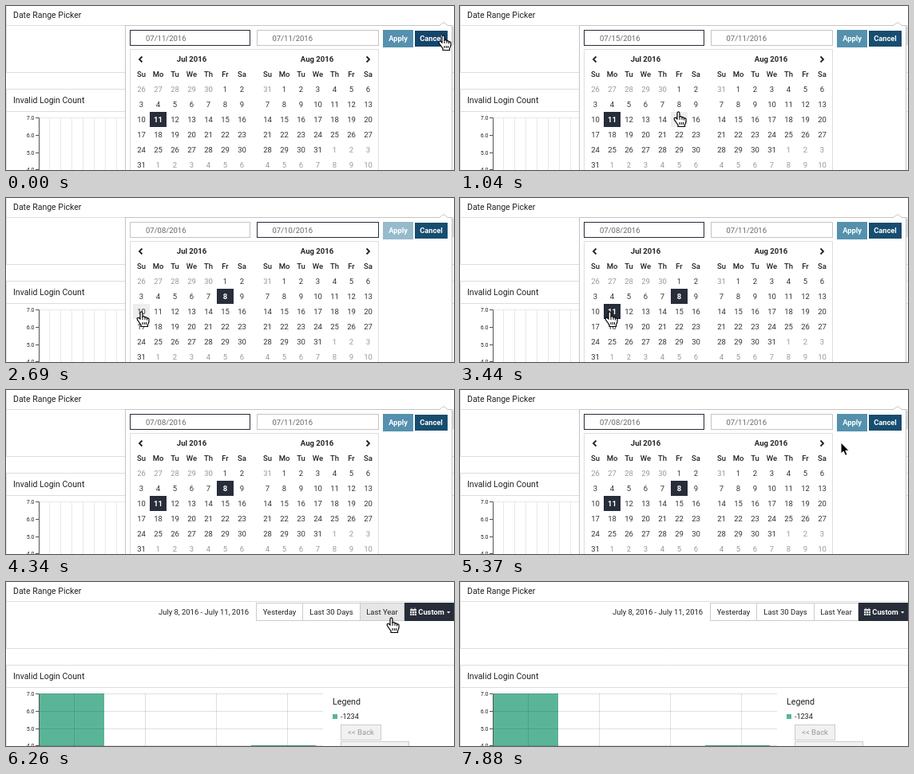
These frames come from a looping animation (561 px wide and 206 px high, 8480 ms). An HTML page:

```html
<!DOCTYPE html>
<html lang="en">
<head>
<meta charset="utf-8">
<title>Date range picker</title>
<style>
html, body { margin: 0; width: 100%; height: 100%; overflow: hidden; background: #fff; }
svg { display: block; font-family: Roboto, Arial, sans-serif; }
</style>
</head>
<body>
<svg id="stage" width="561" height="206" viewBox="0 0 561 206"></svg>
<script>
const LOOP = 8480;
const DARK = '#272d39', GREEN = '#5ab598', LINE = '#ddd';
const DAYS = ['Su', 'Mo', 'Tu', 'We', 'Th', 'Fr', 'Sa'];
const PICK_START = 1940, PICK_END = 3440, APPLIED = 5820, LOADED = 6260;

// Pointer tip: [ms, x, y]; no position means it is off the stage.
const POINTER = [
  [0, 549, 38], [450, 530, 58], [600, 455, 100], [750, 375, 135], [890, 292, 151],
  [1040, 275, 134], [1190, 275, 132], [1340, 274, 130], [1490, 274, 128],
  [2240, 262, 135], [2390, 232, 140], [2540, 205, 143], [2690, 171, 144], [2840, 189, 144],
  [3890, 400, 170], [4040, 538, 189], [4340],
  [5080, 541, 150], [5230, 503, 98], [5370, 477, 66], [5520, 486, 48], [5670, 489, 43],
  [5820, 487, 43], [5960, 486, 44], [6110, 484, 46],
  [7150, 488, 58], [7300, 496, 86], [7450, 508, 124], [7590, 518, 160], [7740, 526, 194], [7880]
];

const rect = (x, y, w, h, fill, more = '') =>
  `<rect x="${x}" y="${y}" width="${w}" height="${h}" fill="${fill}" ${more}/>`;
const box = (x, y, w, h, stroke, fill = '#fff') =>
  rect(x + .5, y + .5, w, h, fill, `stroke="${stroke}"`);
const path = (d, stroke, more = 'fill="none"') => `<path d="${d}" stroke="${stroke}" ${more}/>`;
const text = (x, y, s, size = 9.5, fill = '#222', more = '') =>
  `<text x="${x}" y="${y}" font-size="${size}" fill="${fill}" ${more}>${s}</text>`;
const label = (x, y, s, fill, weight = 400, size = 9.5) =>
  text(x, y, s, size, fill, `text-anchor="middle" font-weight="${weight}"`);
const inside = (p, x, y, w, h) => p && p.x >= x && p.x < x + w && p.y >= y && p.y < y + h;

const pad = n => String(n).padStart(2, '0');
const format = d => `${pad(d.getMonth() + 1)}/${pad(d.getDate())}/${d.getFullYear()}`;

function pointerAt(t) {
  const [, x, y] = POINTER.filter(k => k[0] <= t).pop();
  return x === undefined ? null : { x, y };
}

// Both month grids, built once.
const cells = [];
for (const m of [0, 1]) {
  const lead = new Date(2016, 6 + m, 1).getDay();
  for (let i = 0; i < 42; i++) {
    const date = new Date(2016, 6 + m, 1 - lead + i);
    cells.push({
      date, x: 159 + 158 * m + i % 7 * 21, y: 95 + 19 * Math.floor(i / 7),
      muted: date.getMonth() !== 6 + m
    });
  }
}

function panels() {
  return path('M.5 0V83.5H561M0 24.5H561M.5 206V104.5H561M0 132.5H561', LINE) +
    text(9, 15, 'Date Range Picker', 10.5) + text(9, 122, 'Invalid Login Count', 10.5);
}

function axis() {
  let s = path('M37 140.5H41.5V206M37 162.5H41M37 184.5H41M37 205.5H41', '#555');
  [7, 6, 5, 4].forEach((n, i) =>
    s += text(35.5, 143.2 + 21.7 * i, n + '.0', 7, '#222', 'text-anchor="end"'));
  return s;
}

function emptyChart() {
  let grid = 'M42 140.5H396';
  for (let x = 54.5; x < 396; x += 14) grid += `M${x} 140V206`;
  return path(grid, '#e8e8e8') + axis();
}

function loadedChart() {
  const button = (y, w, s) => box(419, y, w, 19, '#ccc', '#f1f1f1') +
    label(419.5 + w / 2, y + 13, s, '#999');
  return rect(42, 140, 81, 66, GREEN) + rect(307, 205, 81, 1, GREEN) +
    path('M42 140.5H397M42 162.5H397M42 184.5H397M42 205.5H397' +
      'M85.5 140V206M174.5 140V206M263.5 140V206M352.5 140V206', '#000',
      'fill="none" stroke-opacity=".12"') +
    axis() + text(409, 154, 'Legend', 10.7) + rect(409, 166, 6, 6, GREEN) +
    text(419, 172, '-1234', 9) + button(179, 50, '&lt;&lt; Back') +
    button(200, 85, 'Explore Other &gt;&gt;');
}

function toolbar(p) {
  const button = (x, w, s) =>
    box(x, 26, w, 22, '#ccc', inside(p, x, 26, w, 23) ? '#e6e6e6' : '#fff') +
    label(x + .5 + w / 2, 40.5, s);
  return text(191, 40.5, 'July 8, 2016 - July 11, 2016', 9.45) +
    button(313, 58, 'Yesterday') + button(371, 72, 'Last 30 Days') + button(443, 55, 'Last Year') +
    rect(499, 26, 62, 23, DARK) + label(532.5, 40.5, 'Custom', '#fff', 700, 9.3) +
    rect(506, 34, 8, 8, '#ddd') + path('M508 32.5V35M512 32.5V35', '#ddd') +
    path('M506 36.5H514M506 39.5H514M508.5 36V42M511.5 36V42', DARK,
      'fill="none" stroke-width=".6"') +
    '<path d="M552 37h4.4l-2.2 2.4z" fill="#fff"/>';
}

function popup(t, p, hover) {
  const ending = t >= PICK_START && t < PICK_END;
  const selected = t < PICK_START ? [11] : ending ? [8] : [8, 11];
  const isSelected = c => c.date.getMonth() === 6 && selected.includes(c.date.getDate());
  const values = [t < PICK_START ? '07/11/2016' : '07/08/2016', '07/11/2016'];
  if (hover && !isSelected(hover)) values[+ending] = format(hover.date);

  let s = rect(558, 26, 3, 23, '#ddd') + box(149, 24, 409, 200, '#c4c4c4') +
    path('M542 25L548 20.5L554 25', '#c4c4c4', 'fill="#fff"') +
    box(155, 54, 311, 170, LINE);
  values.forEach((v, i) => {
    s += box(155 + 159 * i, 30, 150 + 2 * i, 19, i === +ending ? DARK : '#c4c4c4') +
      text(175 + 158.5 * i, 44, v, 9.5, '#666');
  });
  s += rect(472, 30, 38, 22, ending ? '#96bbcc' : '#5591ae') +
    label(491, 44, 'Apply', '#fff', 700, 9.3) +
    rect(512, 31, 41, 20, inside(p, 512, 31, 41, 20) ? '#14456a' : '#184d70') +
    label(532.5, 44, 'Cancel', '#fff', 700, 9.3);

  s += path('M170.5 63.5L167 67L170.5 70.5M451.5 63.5L455 67L451.5 70.5', '#222',
    'fill="none" stroke-width="1.8"');
  ['Jul 2016', 'Aug 2016'].forEach((name, m) => {
    s += label(232.5 + 157 * m, 70, name, '#222', 700);
    DAYS.forEach((d, i) => s += label(169.5 + 158 * m + 21 * i, 89, d, '#222', 500));
  });
  for (const c of cells) {
    const on = isSelected(c);
    if (on || c === hover) s += rect(c.x, c.y, 21, 19, on ? DARK : '#eee');
    s += label(c.x + 10.5, c.y + 13, c.date.getDate(),
      on ? '#fff' : c.muted ? '#999' : '#333', on ? 700 : 400);
  }
  return s;
}

function pointer(p, hand) {
  const shape = hand
    ? '<g transform="translate(-1 -1)">' +
      path('M-2 9V1.7Q-2-.2-.5-.2T1 1.7V6Q3.5 5 4 7Q6 6 6.5 8Q9 7.5 9 9.5V12Q9 14 7.5 16V18.5H-1' +
        'V16.5L-5.5 10Q-6.5 7-4 7.3Z', '#000', 'fill="#fff" stroke-width="1.2"') +
      path('M1 6V10M4 7V10M6.5 8V10.5M1 13V16M3.3 13V16M5.5 13V16', '#000') + '</g>'
    : path('M0 0V14L3.2 11L5.5 16.2L8 15.2L5.8 10.2H10Z', '#fff', 'fill="#000"');
  return `<g transform="translate(${p.x} ${p.y})">${shape}</g>`;
}

function scene(t) {
  const p = pointerAt(t), open = t < APPLIED;
  const hover = open && cells.find(c => inside(p, c.x, c.y, 21, 19));
  const hand = hover || (open ? inside(p, 472, 30, 81, 21) : inside(p, 313, 26, 248, 23));
  return panels() +
    (open ? emptyChart() + popup(t, p, hover)
      : toolbar(p) + (t >= LOADED ? loadedChart() : '')) +
    (p ? pointer(p, hand) : '');
}

const stage = document.getElementById('stage');
const start = performance.now();
let shown = '';
function draw(now) {
  const next = scene(Math.max(0, now - start) % LOOP);
  if (next !== shown) stage.innerHTML = shown = next;
  requestAnimationFrame(draw);
}
draw(start);
</script>
</body>
</html>
```
